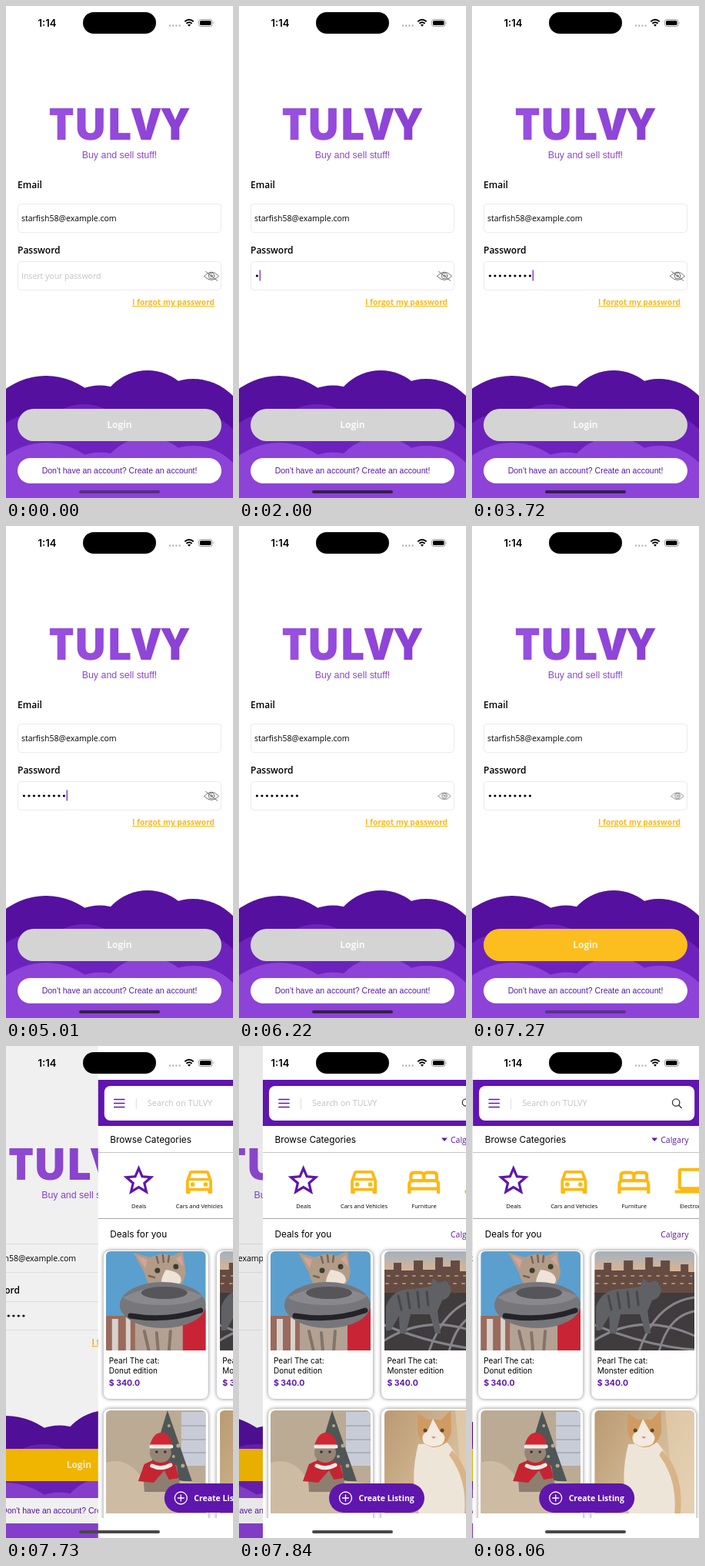
Recreate the animation shown at these times as an HTML page. Size 295 by 640 pixels, loop 8160 ms.

```html
<!DOCTYPE html>
<html lang="en">
<head>
<meta charset="utf-8">
<title>Sign in</title>
<style>
  @property --p { syntax: "<number>"; inherits: true; initial-value: 1; }

  html, body { margin: 0; width: 100%; height: 100%; overflow: hidden; background: #fff; }
  #stage { display: block; width: 295px; height: 640px; animation: push 8.16s step-end infinite; }

  text { font-family: "Open Sans", sans-serif; font-size: 10.5px; }
  .ui { font-family: Inter, sans-serif; }
  .sans { font-family: "Liberation Sans", Arial, sans-serif; }
  .mid { text-anchor: middle; }
  .label { font-size: 12px; font-weight: 600; }
  .head { font-size: 11.8px; }
  .name { font-size: 10px; }
  .cat { font-size: 7.5px; text-anchor: middle; }
  .price { font-weight: 700; fill: #5f16ad; }
  .line { fill: none; stroke-linecap: round; stroke-linejoin: round; }
  .box { fill: #fff; stroke: #ebebeb; }
  .card { fill: #fff; filter: drop-shadow(0 0 2.5px rgba(0, 0, 0, .5)); }

  /* --p runs from 1 (login) to 0 (home) */
  #login { transform: translateX(calc((var(--p) - 1) * 88.5px)); }
  #dim { opacity: calc((1 - var(--p)) * .1); }
  #home { transform: translateX(calc(var(--p) * 295px)); }

  .typed { animation: type 8.16s step-end infinite; }
  #caret { animation: blink 8.16s linear infinite; }
  #hint { animation: hint 8.16s step-end infinite; }
  #eye { transform-origin: 267px 351px; animation: eye 8.16s step-end infinite; }
  #slash { animation: slash 8.16s step-end infinite; }
  #go { animation: enable 8.16s linear infinite; }
  #bar { animation: bar 8.16s linear infinite; }

  @keyframes push {
    0% { --p: 1; }
    93.382% { --p: .987; }
    94.73% { --p: .406; }
    96.078% { --p: .105; }
    97.426% { --p: .023; }
    98.775%, 100% { --p: .004; }
  }
  @keyframes type {
    0% { transform: translateX(0); }
    24.51% { transform: translateX(6.5px); }
    26.103% { transform: translateX(13px); }
    29.167% { transform: translateX(19.5px); }
    31.985% { transform: translateX(26px); }
    34.191% { transform: translateX(32.5px); }
    35.784% { transform: translateX(39px); }
    39.338% { transform: translateX(45.5px); }
    41.176% { transform: translateX(52px); }
    45.588%, 100% { transform: translateX(58.5px); }
  }
  @keyframes blink {
    0%, 17.89% { opacity: 0; }
    17.9%, 51.716% { opacity: 1; }
    54.5%, 57.6% { opacity: 0; }
    61.4%, 64.216% { opacity: 1; }
    67%, 69.8% { opacity: 0; }
    72.4%, 73.77% { opacity: 1; }
    73.78%, 100% { opacity: 0; }
  }
  @keyframes hint {
    0% { opacity: 1; }
    24.51%, 100% { opacity: 0; }
  }
  @keyframes eye {
    0% { transform: none; }
    64.216%, 100% { transform: scale(.86); }
  }
  @keyframes slash {
    0% { opacity: 1; }
    64.216%, 100% { opacity: 0; }
  }
  @keyframes enable {
    0%, 84.92% { fill: #d4d4d4; }
    87%, 91.667% { fill: #fcbd1e; }
    93.382%, 100% { fill: #ffc000; }
  }
  @keyframes bar {
    0%, 11.39% { fill: #55307f; }
    11.4%, 84.92% { fill: #35204b; }
    89%, 93.38% { fill: #5a338c; }
    93.39%, 100% { fill: #484848; }
  }
</style>
</head>
<body>
<svg id="stage" viewBox="0 0 295 640">
  <defs>
    <linearGradient id="brand" x2="1">
      <stop stop-color="#9a50e0"/><stop offset="1" stop-color="#8a40d4"/>
    </linearGradient>
    <linearGradient id="dusk" x2="0" y2="1">
      <stop stop-color="#a3b2c0"/><stop offset=".2" stop-color="#e3b48c"/><stop offset=".4" stop-color="#6f564d"/>
    </linearGradient>
    <linearGradient id="warm" x2="1" y2=".6">
      <stop stop-color="#b99a72"/><stop offset="1" stop-color="#e2ccab"/>
    </linearGradient>
    <clipPath id="shown"><rect class="typed" x="-60" y="340" width="80" height="24"/></clipPath>
    <clipPath id="photo"><rect width="130" height="150" rx="6"/></clipPath>
    <g id="clouds">
      <circle cx="52" cy="569" r="88"/>
      <circle cx="122" cy="554" r="60.500"/>
      <circle cx="184" cy="539" r="65"/>
      <circle cx="243" cy="557" r="72"/>
      <rect x="-40" y="530" width="380" height="150"/>
    </g>
  </defs>

  <g id="login">
    <rect width="295" height="640" fill="#fff"/>
    <text class="mid" x="147" y="174" fill="url(#brand)" style="font-size:56px;font-weight:800">TULVY</text>
    <text class="sans mid" x="147.500" y="198" fill="#8f46d8" style="font-size:12.4px">Buy and sell stuff!</text>

    <text class="label" x="15" y="237">Email</text>
    <rect class="box" x="15.500" y="257.500" width="264" height="37" rx="4"/>
    <text x="20" y="280">starfish58@example.com</text>

    <text class="label" x="15" y="322">Password</text>
    <rect class="box" x="15.500" y="332.500" width="264" height="37" rx="4"/>
    <text id="hint" x="20" y="355" fill="#c3c3c3">Insert your password</text>
    <g clip-path="url(#shown)">
      <path class="line" d="M23.400 351H77" stroke="#000" stroke-width="3.200" stroke-dasharray="0 6.500"/>
    </g>
    <g id="caret"><rect class="typed" x="20" y="343.500" width="1.500" height="14" fill="#7a2fd0"/></g>
    <g id="eye" class="line" stroke="#707070">
      <path d="M257.500 351.500Q267 340.500 276.500 351.500Q267 361.500 257.500 351.500Z"/>
      <circle cx="267" cy="351" r="3.800"/>
      <circle cx="267" cy="351" r="1.200"/>
      <path id="slash" d="M259.500 345.500L275 357.500"/>
    </g>
    <text x="164" y="389" fill="#fbb81a" style="font-size:10.2px;font-weight:700;text-decoration:underline">I forgot my password</text>

    <use href="#clouds" fill="#5510a0"/>
    <use href="#clouds" fill="#6d22bd" transform="matrix(-1 0 0 1 285 44)"/>
    <use href="#clouds" fill="#8d42d8" transform="translate(0 87)"/>
    <rect id="go" x="15" y="524" width="265" height="42" rx="21"/>
    <text class="mid" x="147.500" y="549" fill="#fff" fill-opacity=".85" style="font-size:12px;font-weight:700">Login</text>
    <rect x="15" y="588" width="265" height="33" rx="16.500" fill="#fff"/>
    <text class="sans mid" x="147.500" y="608" fill="#5a17a8">Don't have an account? Create an account!</text>
  </g>
  <rect id="dim" width="295" height="640"/>

  <g id="home">
    <rect width="295" height="640" fill="#fff"/>
    <rect y="44" width="295" height="60" fill="#6014b0"/>
    <rect x="8" y="52" width="280" height="45" rx="8" fill="#fff"/>
    <path class="line" d="M21 69.500H34M21 74.500H34M21 79.500H34" stroke="#5f16ad" stroke-width="1.700"/>
    <path d="M49.500 68V82" stroke="#ddd"/>
    <text x="64" y="78" fill="#c2c2c2" style="font-size:10.8px">Search on TULVY</text>
    <g class="line" stroke="#333" stroke-width="1.300">
      <circle cx="264" cy="73.500" r="4.700"/><path d="M267.500 77L271 80.500"/>
    </g>

    <text class="ui head" x="15.500" y="126">Browse Categories</text>
    <path d="M232 119.500H240L236 124Z" fill="#5f16ad"/>
    <text x="244" y="126" fill="#5f16ad">Calgary</text>
    <path d="M0 138.500H295" stroke="#c4c4c4"/>
    <path d="M0 224.500H295" stroke="#a8a8a8"/>

    <path transform="translate(28.700 151) scale(2)" fill="#5f16ad" fill-rule="evenodd" d="M22 9.240L14.800 8.620L12 2L9.200 8.630L2 9.240L7.460 13.970L5.820 21L12 17.270L18.180 21L16.550 13.970ZM12 15.400L8.240 17.670L9.240 13.390L5.920 10.510L10.300 10.130L12 6.100L13.710 10.140L18.090 10.520L14.770 13.400L15.770 17.680Z"/>
    <g fill="#fcb913" fill-rule="evenodd">
      <g transform="translate(108.500 154.500) scale(1.890)">
        <path d="M18.900 5Q18.500 4 17.500 4H6.500Q5.400 4 5.100 5L3 11V19Q3 20 4 20H5Q6 20 6 19V18H18V19Q18 20 19 20H20Q21 20 21 19V11ZM6.850 6H17.150L18.200 9.100H5.800ZM19 16H5V11H19Z"/>
        <circle cx="7.500" cy="13.500" r="1.500"/><circle cx="16.500" cy="13.500" r="1.500"/>
      </g>
      <path transform="translate(184 152) scale(2.100)" d="M21 10.800V8Q21 5 18 5H14Q13 5 12 5.800Q11 5 10 5H6Q3 5 3 8V10.800Q2 11.700 2 13V19H4V17H20V19H22V13Q22 11.700 21 10.800ZM14 7H18Q19 7 19 8V10H13V8Q13 7 14 7ZM5 8Q5 7 6 7H10Q11 7 11 8V10H5ZM4 15V13Q4 12 5 12H19Q20 12 20 13V15Z"/>
      <path transform="translate(262.500 150.500) scale(2.050)" d="M20 18Q22 18 22 16V6Q22 4 20 4H4Q2 4 2 6V16Q2 18 4 18H0V20H24V18ZM4 6H20V16H4Z"/>
    </g>
    <text class="cat" x="53" y="210.500">Deals</text>
    <text class="cat" x="131.500" y="210.500">Cars and Vehicles</text>
    <text class="cat" x="209.500" y="210.500">Furniture</text>
    <text class="cat" x="287.500" y="210.500">Electronics</text>

    <text class="ui head" x="15.500" y="249">Deals for you</text>
    <text x="244" y="249" fill="#5f16ad">Calgary</text>

    <svg width="295" height="614">
      <rect class="card" x="7" y="266" width="136" height="193" rx="8"/>
      <rect class="card" x="154" y="266" width="136" height="193" rx="8"/>
      <rect class="card" x="7" y="472" width="136" height="193" rx="8"/>
      <rect class="card" x="154" y="472" width="136" height="193" rx="8"/>

      <svg x="10" y="267" width="130" height="129"><g clip-path="url(#photo)">
        <rect width="130" height="150" fill="#5b9fce"/>
        <path d="M0 84H42V130H0Z" fill="#9a6a5c"/>
        <path d="M8 88H16V130H8ZM26 84H32V130H26Z" fill="#d7d2cc"/>
        <path d="M94 88L130 74V130H94Z" fill="#c92435"/>
        <path d="M38 85H100V130H38Z" fill="#b3a193"/>
        <path class="line" d="M50 104L56 130M66 106L68 130M84 104L82 130" stroke="#82746a" stroke-width="4"/>
        <path d="M36 2L58 8Q74 0 86 6L100 0L104 28Q98 54 78 54Q54 50 50 28Z" fill="#b39c87"/>
        <path d="M41 6L54 11L51 22ZM98 5L101 20L91 10Z" fill="#d3a39a"/>
        <path class="line" d="M66 7L68 15M74 5L75 14M82 6L81 14M56 32L63 34" stroke="#75665a" stroke-width="2.500"/>
        <path d="M78 24Q97 26 98 38Q92 53 76 52Q67 42 78 24Z" fill="#eee3d9"/>
        <circle cx="67" cy="25" r="3.500" fill="#3c3f2e"/><circle cx="91" cy="20" r="3.500" fill="#3c3f2e"/>
        <path d="M87 43L94 42L94 51Q90 54 87 50Z" fill="#df7180"/>
        <ellipse cx="74" cy="70" rx="56" ry="30" fill="#77767b"/>
        <path d="M22 60Q74 34 126 58Q112 70 74 70T22 60Z" fill="#89888d"/>
        <ellipse cx="76" cy="54" rx="30" ry="8" fill="#56555a"/>
        <path class="line" d="M32 84Q80 92 123 77" stroke="#242328" stroke-width="7"/>
      </g></svg>

      <svg x="158" y="267" width="130" height="129"><g clip-path="url(#photo)">
        <rect width="130" height="150" fill="url(#dusk)"/>
        <path d="M0 24H12V15H22V25H38V12H50V24H66V8H76V20H86V12H98V26H112V17H122V27H130V56H0Z" fill="#654c43"/>
        <path class="line" d="M4 32H126M2 42H128" stroke="#b98a68" stroke-width="2" stroke-dasharray="3 8"/>
        <path d="M0 54H130V130H0Z" fill="#403b3d"/>
        <g class="line" stroke="#85848a" stroke-width="3">
          <path d="M130 60Q80 66 58 130M130 78Q96 84 84 130M0 116Q60 78 130 110M0 96Q70 124 130 128"/>
        </g>
        <path d="M2 72Q10 48 38 49L60 46L63 35L70 41L80 38L86 47Q88 60 75 64L69 78L73 107H66L59 82L34 82L28 107H20L19 84L8 103H2Z" fill="#5f6165"/>
        <path class="line" d="M18 58L22 76M30 54L33 74M43 53L45 73M55 53L57 70" stroke="#45474c" stroke-width="3"/>
      </g></svg>

      <svg x="10" y="474" width="130" height="134"><g clip-path="url(#photo)">
        <rect width="130" height="150" fill="#bbaa94"/>
        <rect x="98" y="2" width="32" height="70" fill="#c8ccd6"/>
        <path d="M98 20H130M98 38H130M98 55H130" stroke="#aab0bc" stroke-width="2"/>
        <path d="M80 0L112 92H52Z" fill="#4f5656"/>
        <g fill="#b8a58e"><circle cx="82" cy="20" r="2"/><circle cx="94" cy="46" r="2.500"/><circle cx="100" cy="72" r="2.500"/><circle cx="88" cy="60" r="2"/></g>
        <path d="M0 68Q26 60 44 84L130 96V150H0Z" fill="#cdbca3"/>
        <path d="M48 74Q70 55 92 72L98 106H50Z" fill="#8e7e6f"/>
        <path d="M50 70Q70 58 90 70L95 88L82 90L76 78L62 94L42 92Z" fill="#c52431"/>
        <ellipse cx="71" cy="55" rx="14" ry="13" fill="#958575"/>
        <circle cx="66" cy="54" r="1.800" fill="#3a332c"/><circle cx="77" cy="54" r="1.800" fill="#3a332c"/>
        <path d="M57 46Q62 27 75 29Q85 33 86 46Z" fill="#cf2733"/>
        <path class="line" d="M59 47H85M60 72Q72 78 84 71" stroke="#f2ece7" stroke-width="5"/>
      </g></svg>

      <svg x="158" y="474" width="130" height="134"><g clip-path="url(#photo)">
        <rect width="130" height="150" fill="url(#warm)"/>
        <path d="M92 0H130V134H104Z" fill="#e6d2b4" opacity=".6"/>
        <path d="M44 44Q32 90 45 134H112Q116 84 82 42Z" fill="#eee5d9"/>
        <path d="M88 52Q116 80 112 134H104Q108 90 84 58Z" fill="#d9b488"/>
        <path d="M43 4L56 12H74L86 0L87 28Q82 48 63 48Q45 44 43 25Z" fill="#d09b62"/>
        <path d="M63 11L72 27Q83 34 75 44Q62 51 51 42Q46 32 56 27Z" fill="#f3eae0"/>
        <circle cx="53" cy="26" r="2.500" fill="#574c30"/><circle cx="75" cy="26" r="2.500" fill="#574c30"/>
        <path d="M61 34H67L64 37Z" fill="#d58f85"/>
      </g></svg>
    </svg>

    <text class="ui name" x="14" y="413">Pearl The cat:</text>
    <text class="ui name" x="14" y="425.500">Donut edition</text>
    <text class="ui price" x="14" y="441.500">$ 340.0</text>
    <text class="ui name" x="161.500" y="413">Pearl The cat:</text>
    <text class="ui name" x="161.500" y="425.500">Monster edition</text>
    <text class="ui price" x="161.500" y="441.500">$ 340.0</text>

    <rect x="86" y="569" width="124" height="38" rx="19" fill="#5f16ad"/>
    <g class="line" stroke="#fff" stroke-width="1.300">
      <circle cx="107.500" cy="588" r="8"/><path d="M103.500 588H111.500M107.500 584V592"/>
    </g>
    <text x="124.500" y="592" fill="#fff" style="font-weight:700">Create Listing</text>
  </g>

  <g id="status">
    <text class="ui" x="41.500" y="27" style="font-size:13px;font-weight:600">1:14</text>
    <rect x="100" y="8" width="95" height="28" rx="14"/>
    <path class="line" d="M213 25.500H226" stroke="#b5b5b5" stroke-width="2.400" stroke-dasharray="0 4.200"/>
    <g class="line" stroke="#000" stroke-width="1.900" style="stroke-linecap:butt">
      <path d="M232.300 20.300Q238 15.300 243.700 20.300M234.400 22.800Q238 19.600 241.600 22.800"/>
    </g>
    <path d="M236 24.500Q238 22.800 240 24.500L238 26.700Z"/>
    <rect x="250.500" y="17.500" width="17.500" height="9" rx="2.800" fill="none" stroke="#999"/>
    <rect x="252" y="19" width="14.500" height="6" rx="1.600"/>
    <path d="M269.300 20.500Q270.800 22 269.300 23.500Z" fill="#999"/>
    <rect id="bar" x="95" y="630" width="105" height="4" rx="2"/>
  </g>
</svg>
</body>
</html>
```
